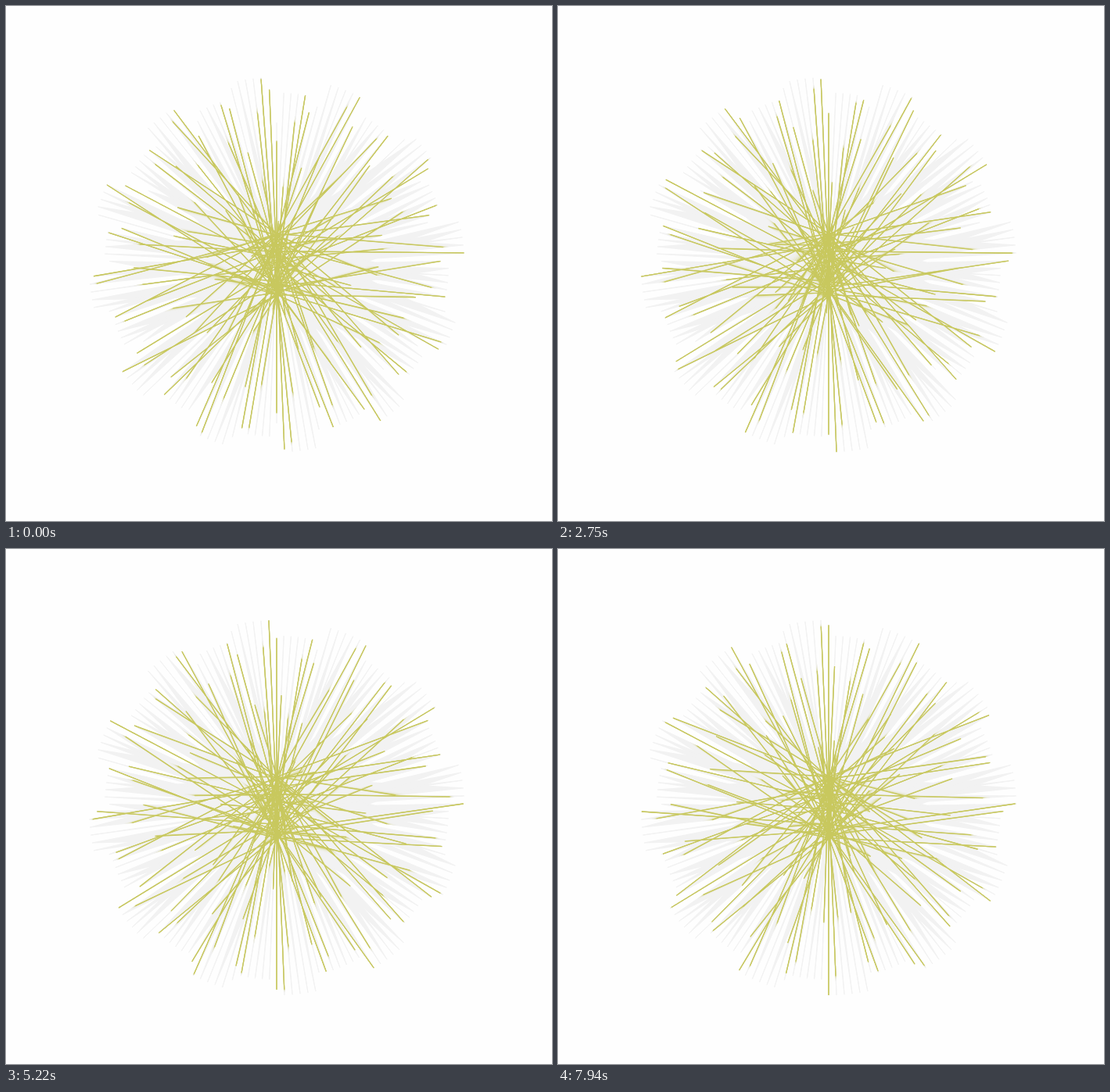
Recreate the animation shown at these times as an HTML page with a canvas. Size 698 by 659 pixels, loop 8000 ms.

```html
<!DOCTYPE html>
<html lang="en">
<head>
<meta charset="utf-8">
<title>Oscillating needles</title>
<style>
  html, body { margin: 0; width: 100%; height: 100%; overflow: hidden; background: #fefefe; }
  canvas { display: block; width: 698px; height: 659px; }
</style>
</head>
<body>
<canvas id="stage" width="698" height="659"></canvas>
<script>
const ctx = document.getElementById('stage').getContext('2d');
const RAD = Math.PI / 180;
const LOOP = 8000;
const COUNT = 150;
const CX = 346, CY = 331;
const START = 51.6;      // phase of the first needle, degrees
const STEP = 0.652;      // phase gained per tick
const SWEPT = 108;       // phase already travelled before the loop starts
const TRAIL = 10;
const GREY = [242, 242, 242], INK = [200, 200, 94];

// bursts of ticks: first time, last time, number of ticks
const BURSTS = [
  [120, 1100, 8], [1210, 2160, 8], [2310, 3310, 8], [3460, 4390, 8],
  [4540, 5520, 8], [5670, 5810, 2], [6110, 7060, 8], [7200, 7940, 6]
];
const ticks = BURSTS.flatMap(([a, b, n]) =>
  Array.from({ length: n }, (_, i) => a + (b - a) * i / (n - 1)));

const needles = Array.from({ length: COUNT }, (_, j) => {
  const angle = j * 2 * Math.PI / COUNT;
  return {
    sin: Math.sin(angle),
    cos: Math.cos(angle),
    offset: j * 0.5,
    root: CY - 40 * Math.cos(1.26 * j)
  };
});

const reach = (needle, phase) => 10 + 230 * Math.sin(needle.offset + phase * RAD);

const tip = (needle, r) => [CX + r * needle.sin, CY + r * needle.cos];

// everything a needle has passed over, as a triangle
function drawSwept(phase) {
  const from = START - SWEPT;
  ctx.fillStyle = ctx.strokeStyle = `rgb(${GREY})`;
  ctx.lineWidth = 1;
  for (const n of needles) {
    let low = Infinity, high = -Infinity;
    for (let i = 0; i <= 40; i++) {
      const r = reach(n, from + (phase - from) * i / 40);
      low = Math.min(low, r);
      high = Math.max(high, r);
    }
    ctx.beginPath();
    ctx.moveTo(CX, n.root);
    ctx.lineTo(...tip(n, low));
    ctx.lineTo(...tip(n, high));
    ctx.closePath();
    ctx.fill();
    ctx.stroke();
  }
}

function drawNeedles(phase, strength, width) {
  const mix = GREY.map((g, i) => Math.round(g + (INK[i] - g) * strength));
  ctx.strokeStyle = `rgb(${mix})`;
  ctx.lineWidth = width;
  ctx.beginPath();
  for (const n of needles) {
    ctx.moveTo(CX, n.root);
    ctx.lineTo(...tip(n, reach(n, phase)));
  }
  ctx.stroke();
}

function draw(tick) {
  const phase = START + tick * STEP;
  ctx.fillStyle = '#fefefe';
  ctx.fillRect(0, 0, 698, 659);
  drawSwept(phase);
  for (let i = TRAIL; i > 0; i--) {
    drawNeedles(phase - i * 0.4, Math.exp(-i * 0.36), 1);
  }
  drawNeedles(phase, 1, 1.35);
}

let shown = -1;
function frame(now) {
  const t = now % LOOP;
  const tick = ticks.filter(at => at <= t).length;
  if (tick !== shown) draw(shown = tick);
  requestAnimationFrame(frame);
}
draw(0);
requestAnimationFrame(frame);
</script>
</body>
</html>
```
